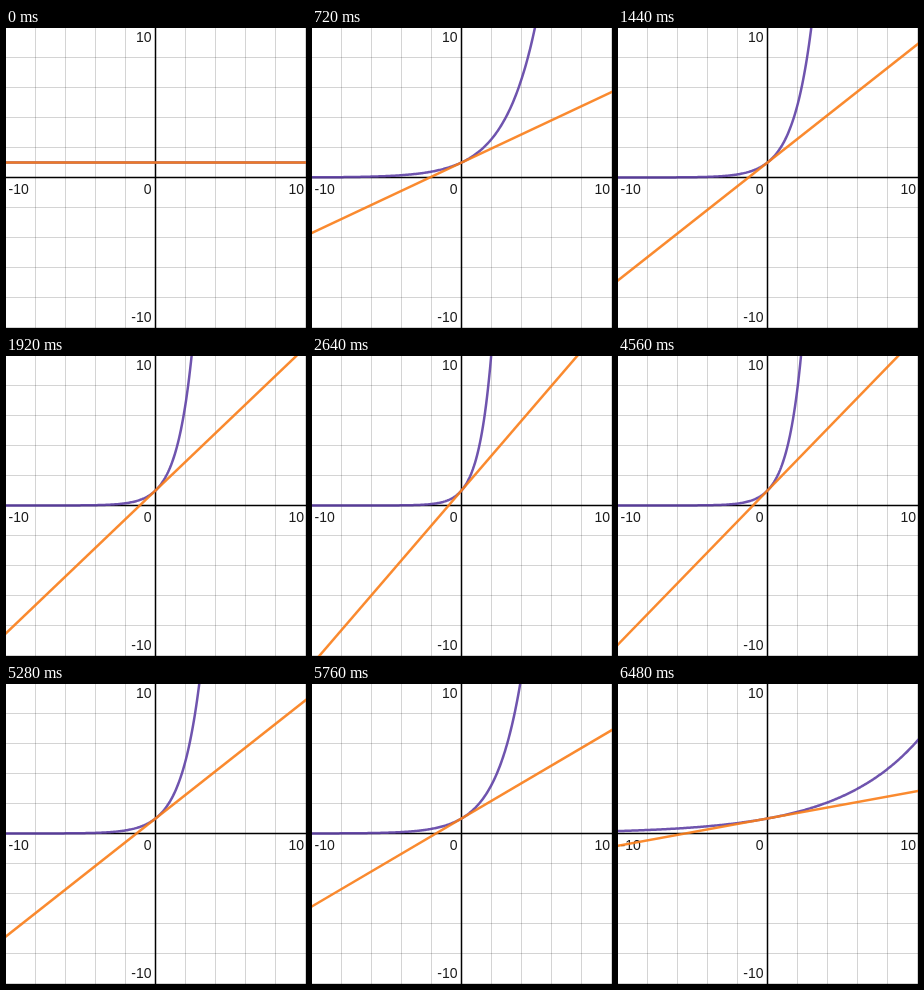
Write an HTML page that moves like this. It is 300 px wide and 300 px high and loops after 6720 ms.

```html
<!DOCTYPE html>
<html lang="en">
<head>
<meta charset="utf-8">
<title>Exponential curve and its tangent</title>
<style>
  html, body { margin: 0; width: 100%; height: 100%; overflow: hidden; background: #fff; }
  svg { display: block; width: 100vw; height: 100vh; }
  text { font: 14px Arial, "Liberation Sans", sans-serif; fill: #1c1c1c; }
  .end { text-anchor: end; }
  .plot { fill: none; stroke-width: 2.5; stroke-opacity: .9; stroke-linejoin: round; }
</style>
</head>
<body>
<svg viewBox="0 0 300 300">
  <path id="grid" fill="none" stroke="#000" stroke-opacity=".17"/>
  <path d="M149.5 0V300M0 149.5H300" stroke="#000" stroke-width="1.5"/>
  <text x="2.5" y="166">-10</text>
  <text class="end" x="145.5" y="166">0</text>
  <text class="end" x="298" y="166">10</text>
  <text class="end" x="145.5" y="14">10</text>
  <text class="end" x="145.5" y="294">-10</text>
  <path id="curve" class="plot" stroke="#6042a6"/>
  <path id="tangent" class="plot" stroke="#fa7e19"/>
</svg>
<script>
  const STEP = 240, COUNT = 28, HALF = COUNT / 2;
  const MID = 149.5, UNIT = 15;
  const $ = id => document.getElementById(id);
  const toX = px => (px - MID) / UNIT;
  const toPx = y => (MID - y * UNIT).toFixed(2);

  let grid = "";
  for (let p = 29.5; p < 300; p += 30) {
    if (p !== MID) grid += `M${p} 0V300M0 ${p}H300`;
  }
  $("grid").setAttribute("d", grid);

  // Samples f across the stage and stops once it has left the top edge.
  function trace(f) {
    const pts = [];
    for (let px = -2; px <= 302; px++) {
      const y = f(toX(px));
      pts.push(px + " " + toPx(y));
      if (y > 11) break;
    }
    return "M" + pts.join("L");
  }

  // The base climbs from 1 to 3.8 and returns, in steps of 0.2.
  function draw(ms) {
    const k = Math.floor(ms / STEP) % COUNT;
    const base = 1 + 0.2 * (HALF - Math.abs(HALF - k));
    const slope = Math.log(base);
    const line = x => 1 + slope * x;
    $("curve").setAttribute("d", trace(x => Math.exp(slope * x)));
    $("tangent").setAttribute("d", `M-2 ${toPx(line(toX(-2)))}L302 ${toPx(line(toX(302)))}`);
  }

  const start = performance.now();
  function tick(now) {
    draw(Math.max(0, now - start));
    requestAnimationFrame(tick);
  }
  draw(0);
  requestAnimationFrame(tick);
</script>
</body>
</html>
```
